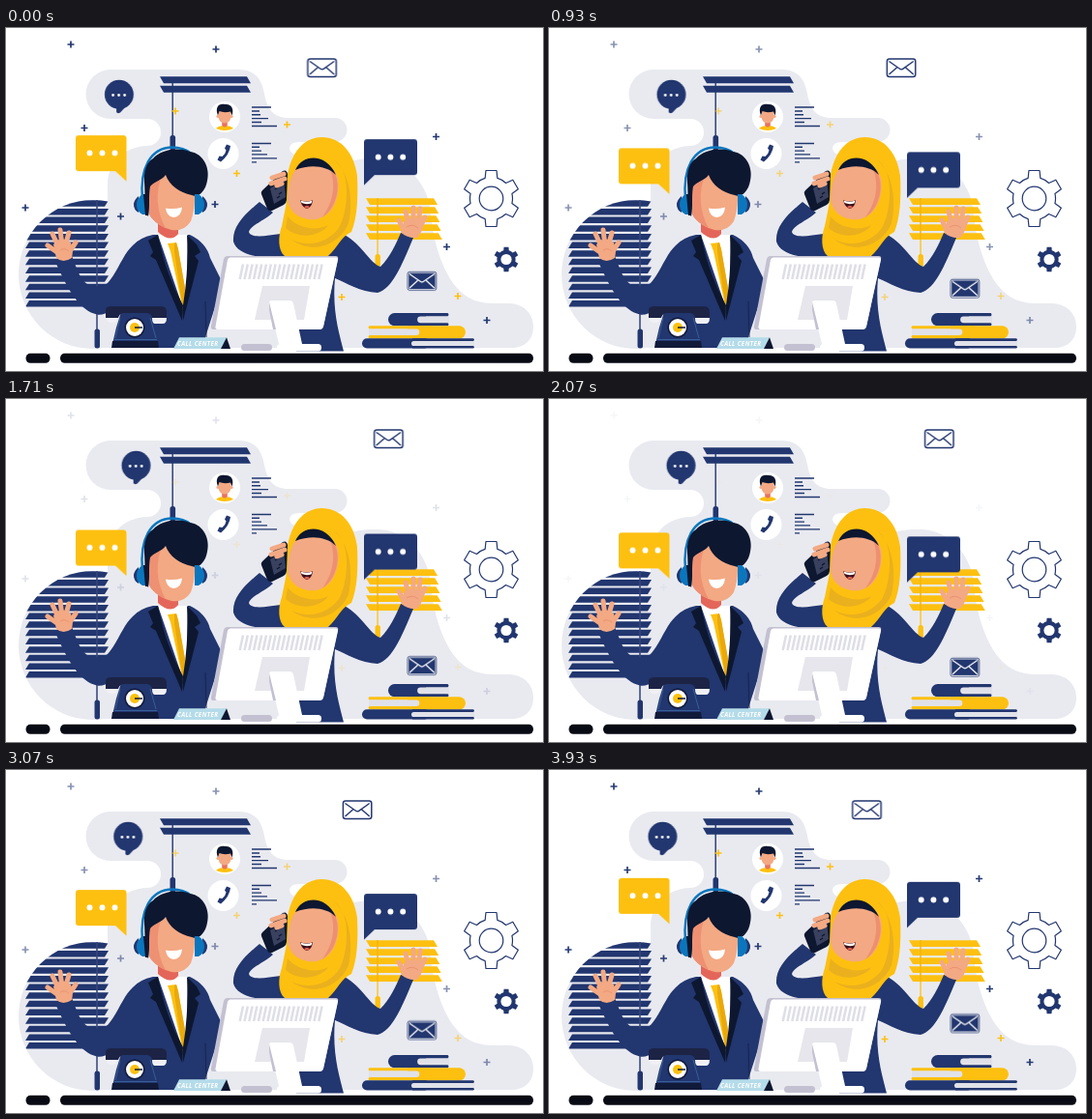
These frames come from a looping animation (555x355 px, 4000 ms). An HTML page:

```html
<!DOCTYPE html>
<html lang="en">
<head>
<meta charset="utf-8">
<title>Call center</title>
<style>
  html, body { margin: 0; width: 100%; height: 100%; overflow: hidden; background: #fff; }
  svg { display: block; width: 555px; height: 355px; }
  .move { animation: move 2s linear -10ms infinite alternate; }
  .fade { animation: fade 2s linear -10ms infinite alternate; }
  @keyframes move { to { transform: translate(var(--x, 0), var(--y, 0)); } }
  @keyframes fade { to { opacity: 0; } }
  .navy { fill: #22366f; }
  .dark { fill: #0d1730; }
  .gold { fill: #fdc010; }
  .skin { fill: #f3a983; }
  .pale { fill: #e9eaf0; }
  .white { fill: #fff; }
  .line { fill: none; stroke: #22366f; stroke-width: 1.4; }
  .hand { fill: none; stroke: #f3a983; stroke-width: 5; stroke-linecap: round; stroke-linejoin: round; }
</style>
</head>
<body>
<svg viewBox="0 0 555 355">
  <defs>
    <clipPath id="disc"><circle cx="90" cy="255" r="77"/></clipPath>
  </defs>

  <!-- backdrop -->
  <circle class="pale" cx="90" cy="255" r="77"/>
  <path class="pale" d="M108 43H240C258 43 264 53 267 68C270 84 276 93 292 93H340A12.500 12.500 0 0 1 340 118H303Q293 118 293 125Q294 131 305 133L352 140C362 135 374 135 386 135C405 136 419 147 428 160C436 172 438 182 439 192C441 217 449 246 462 264C474 280 487 285 505 285H520C537 286 545 297 545 309C545 323 536 331 522 331H90L105 240V162C105 140 121 123 146 122A14 14 0 0 0 146 94H108A25.500 25.500 0 0 1 108 43Z"/>

  <!-- window blinds -->
  <g class="navy">
    <path d="M159 50.300H249L253 57.300H163ZM159 59.800H249L253 66.800H163Z"/>
    <rect x="171.500" y="57" width="1.400" height="55"/>
    <rect x="93.300" y="178" width="1.400" height="136"/>
    <rect x="169.500" y="111" width="5.600" height="16" rx="2.500"/>
    <rect x="91.500" y="311.500" width="5.500" height="20" rx="2.500"/>
    <g id="leftBlind" clip-path="url(#disc)"></g>
  </g>
  <path d="M94 178V289" stroke="#59668f" stroke-width=".6"/>
  <g class="gold">
    <g id="rightBlind"></g>
    <rect x="383.400" y="176" width="1.300" height="60"/>
    <rect x="381.500" y="234" width="5.400" height="13.500" rx="2.500"/>
  </g>
  <path d="M384 176V219" stroke="#eaa90f" stroke-width=".7"/>

  <!-- contact list -->
  <circle class="white" cx="226" cy="92" r="16"/>
  <path class="gold" d="M217 104Q219.500 101 226 101Q232.500 101 235 104Q231 106 226 106Q221 106 217 104Z"/>
  <path d="M223.200 95h5.600v6q-2.800 3-5.600 0Z" fill="#e8735f"/>
  <path class="skin" d="M219.500 85h13v7q-1 6.500-6.500 6.500t-6.500-6.500Z"/>
  <circle class="skin" cx="219" cy="91.500" r="1.600"/><circle class="skin" cx="233" cy="91.500" r="1.600"/>
  <path class="dark" d="M219 90.500C216 83 219 78 226 79C233 78 236 84 233.500 90.500L232 86.500Q225 88 220.500 86Z"/>
  <circle class="white" cx="224.500" cy="130" r="16"/>
  <path class="navy" d="M228 120.500L232 122Q231 131 222 138.500L218.500 136.500L220.500 132.500L223.500 133Q227 130 227.500 126.500L226 124.500Z"/>
  <path class="line" d="M254 82h20m-20 4h8m-8 3.800h9m-9 3.800h17m-17 3.900h10m-10 4h26M254 119.500h20m-20 3.800h8m-8 3.800h10m-10 3.800h16m-16 4h26m-26 4h5"/>

  <!-- man -->
  <g>
    <path class="navy" d="M51 242L68 236C73 248 76 260 84 265C92 268 99 269 105 264C115 253 121 234 131 225Q138 217 152 214H190Q207 222 211 238L224 264L206 320V331H122V289C112 290 103 298 94 296.500C74 292 62 266 51 242Z"/>
    <path class="white" d="M157 214H188L187 266L183 290Z"/>
    <path d="M157 202H178V213Q170 223 157 211Z" fill="#e4665a"/>
    <path class="gold" d="M167 223L176 222L178 229L186 275L183 292L170 231Z"/>
    <path d="M174 223L176 222L178 229L186 275L183 292L174 232Z" fill="#e9a90d"/>
    <path class="dark" d="M157 214L147 220L152 232L149 236L155 240L182 303L183 287Q165 255 157 214ZM187 214L197 224L201 232L195 236L199 241L183 303L183 287Q189 250 187 214Z"/>
    <path d="M206 283L207 320" stroke="#16244f" stroke-width="1"/>
    <path class="skin" d="M147 150H194C196 168 196 187 191 200Q184 211 171 209Q158 206 149 195Z"/>
    <path d="M147 160L162 151C154 168 155 190 165 207Q153 202 148 193Z" fill="#ee9072"/>
    <path d="M141 177C138 146 149 123.500 172 123.500C188 123.500 198 133 202 146" fill="none" stroke="#0b76bd" stroke-width="2.400"/>
    <path class="dark" d="M147 195C143 191 144 175 143 160C142 149 145 139 152 135C160 126 177 123 190 128C205 130 211 146 208 158C206 170 198 176 192 173C179 170 169 163 165 152C161 158 154 158 149 164C147 174 149 185 147 195Z"/>
    <path class="white" d="M165 186.500Q174 188 182 185.500Q181 196 173 196Q166 195 165 186.500Z"/>
    <path class="navy" d="M137 174Q132 178 132 183T137 191ZM203 174Q208 178 208 183T203 191Z"/>
    <path d="M146 172h-5q-6 4-6 11t6 10h5ZM195 172h4q6 4 6 11t-6 10h-4Z" fill="#0b76bd"/>
    <path class="dark" d="M142 172h5v22h-3Z"/>
    <path class="skin" d="M49 224Q58 214 67 222Q70 231 68 238Q59 244 52 238Z"/>
    <path class="hand" d="M54 233L43 225M55 228L48 213M58 225L56 209M61 226L65 212M64 234L72 222"/>
    <path d="M56 230Q60 227 65 231" fill="none" stroke="#e88d70" stroke-width=".8"/>
  </g>

  <!-- woman -->
  <g>
    <path class="navy" d="M262 180C245 194 234 206 235 221C239 235 262 238 285 239L300 334.500H349C344 315 337 292 340 259C352 264 366 273 384 274C399 270 409 246 421 217L408 212C403 224 396 238 387 247C376 244 366 220 346 212.500Q340 210 332 214L284 213C269 215 253 218 251 211C253 204 266 200 276 191Z"/>
    <path d="M340 258Q333 250 331 239" fill="none" stroke="#16244f" stroke-width="1"/>
    <path class="gold" d="M326 113C347 113 360 130 363 153C364 177 363 196 357 211C346 216 343 227 333 236H288C281 230 281 216 285 205L290 180C287 151 296 114 326 113Z"/>
    <path d="M337 135C358 145 354 190 344 207C334 221 314 228 295 219C318 236 346 223 354 202C360 177 354 146 337 135ZM291 195C300 207 321 211 333 204C325 216 302 219 289 207Z" fill="#eab01d"/>
    <path class="skin" d="M299 147C306 132 334 132 343 155C346 173 339 194 321 198C304 200 291 190 291 175C292 163 294 153 299 147Z"/>
    <path d="M334 143C348 154 345 184 327 196C341 176 340 158 334 143Z" fill="#ee8f72"/>
    <path class="dark" d="M299 147C306 130 331 129 341 152C331 142 314 141 299 147Z"/>
    <path d="M304 178Q311 181 317 178Q316 186 311 187Q306 186 304 178Z" fill="#3b0d19"/>
    <path class="white" d="M304.500 178.500Q311 181 316.500 178.500L315.500 181.500Q310 183 305.500 181Z"/>
    <path d="M308 185q3-2 6 0q-3 3-6 0Z" fill="#e4665a"/>
    <path class="dark" d="M265 168L286 148Q290 146 291 151L290 178Q290 181 287 183L275 189Q272 190 270 187L264 172Q263 170 265 168Z"/>
    <path d="M273 166L287 157L289 175L277 182Z" fill="#39415f"/>
    <path d="M278 167l3-2m1 7l3-2m-5 6l3-2" stroke="#0d1730" stroke-width="1.500"/>
    <path class="hand" d="M287 151L275 155M288 156L274 161M285 161L280 163"/>
    <path class="skin" d="M411 200Q418 194 431 200Q433 208 425 217Q414 218 408 211Z"/>
    <path class="hand" d="M411 209L406 199M416 203L413 190M421 202L421 186M426 203L428 187M428 206L433 196"/>
    <path d="M414 206Q420 202 426 207" fill="none" stroke="#e88d70" stroke-width=".8"/>
  </g>

  <!-- computer -->
  <rect x="243" y="327" width="32" height="7" rx="3.500" fill="#c3c1d1"/>
  <path d="M229 236H341Q344 236 343 239L328 309Q327 312 324 312H215Q211 312 212 308L225 239Q226 236 229 236Z" fill="#c3c1d1"/>
  <path d="M232 237.500H341Q343.500 237.500 343 240L328 309Q327 312 324 312H219Q216 312 216.500 309L229 240Q229.500 237.500 232 237.500Z" fill="#fff"/>
  <path id="vents" fill="none" stroke="#dedee6" stroke-width="2.500"/>
  <path d="M265 267H314L308 302H257Z" fill="#e6e6ec"/>
  <path d="M272 284Q272 282 275 282H293Q296 282 297 285L306 327H282Z" fill="#fff"/>
  <path d="M272 284L279 312H276L272 292Z" fill="#c3c1d1"/>
  <rect class="white" x="280" y="327" width="46" height="7.500" rx="3.500"/>

  <!-- telephone -->
  <path class="navy" d="M119 294H149L155 312L158 327H110L114 310Z"/>
  <path d="M110 324H157L158 331H109Z" fill="#111a39"/>
  <path d="M112 322.500H156M118 300L113 321M149 300L155 321" stroke="#3d6aa3" stroke-width=".8"/>
  <path d="M103 291Q104 288 109 288H160Q166 288 166 294V300H151Q151 296 146 295H121Q117 296 116 300H103Z" fill="#1c2345"/>
  <path d="M151 300H166Q166 306 162 306H154Q151 306 151 300ZM103 300H116Q115 305 110 305Q104 305 103 300Z" fill="#f1f1f5"/>
  <circle cx="133" cy="310" r="10.500" fill="#111a39"/>
  <circle class="white" cx="133" cy="310" r="9"/>
  <circle class="gold" cx="133" cy="310" r="5"/>
  <path d="M133 310h8" stroke="#111a39" stroke-width="1.500"/>

  <!-- name plate -->
  <path d="M179 320.300H228L222 332H173Z" fill="#b4dbe9"/>
  <path class="dark" d="M228 320.300L232 332H222Z"/>
  <text x="177" y="328.600" fill="#fff" font-family="'Open Sans', sans-serif" font-size="6.200" font-weight="700" font-style="italic" letter-spacing=".4">CALL CENTER</text>

  <!-- books -->
  <rect class="navy" x="395" y="295" width="40" height="13.300" rx="6.600"/>
  <path class="navy" d="M415 295H456.500q2 1.700 0 3.400H415ZM415 305H456.500q2 1.700 0 3.300H415Z"/>
  <path d="M458 298.400V305.200H428.500a3.400 3.400 0 0 1 0-6.800Z" fill="#e0e1e9"/>
  <rect class="gold" x="414" y="308.300" width="61" height="13" rx="6.500"/>
  <path class="gold" d="M440 308.300H375.500q-2 1.600 0 3.200H440ZM440 318H375.500q-2 1.600 0 3.300H440Z"/>
  <path d="M375 311.500V318H424a3.200 3.200 0 0 0 0-6.500Z" fill="#e0e1e9"/>
  <rect class="navy" x="368" y="321.300" width="70" height="10.200" rx="5.100"/>
  <path class="navy" d="M420 321.300H483q2 1.300 0 2.600H420ZM420 329H483q2 1.300 0 2.500H420Z"/>
  <path d="M484 323.900V329H421.500a2.500 2.500 0 0 1 0-5.100Z" fill="#e0e1e9"/>

  <!-- desk -->
  <g fill="#080a14">
    <rect x="20.500" y="336.800" width="25" height="10" rx="4.700"/>
    <rect x="56" y="336.800" width="489" height="10" rx="4.700"/>
  </g>

  <!-- gears -->
  <path id="bigGear" class="line" style="fill:#fff;stroke-width:1.200" stroke-linejoin="round"/>
  <circle class="line" cx="501.500" cy="176.500" r="12.300" style="stroke-width:1.200"/>
  <path id="smallGear" class="navy"/>
  <circle class="white" cx="517" cy="239.500" r="5.600"/>

  <g id="stars" class="fade" stroke-width="1.700"></g>

  <!-- messages -->
  <g class="move" style="--x:80.500px">
    <rect class="line" x="311.400" y="32" width="29.400" height="18.400" rx="2.500" style="fill:#fff;stroke-width:1.500"/>
    <path class="line" d="M313.500 34.500L324.500 42.300Q326.100 43.400 327.700 42.300L338.700 34.500M313.500 48L321.500 41M338.700 48L330.700 41"/>
  </g>
  <g class="move" style="--y:16.500px">
    <rect class="line" x="415" y="252.300" width="29.800" height="19" rx="2" style="fill:#fff;stroke-width:.8"/>
    <rect class="navy" x="416.200" y="253.500" width="27.400" height="16.600" rx="1"/>
    <path d="M417 254.500L428.300 262.300Q429.900 263.400 431.500 262.300L442.800 254.500M417 269L425.500 261.300M442.800 269L434.300 261.300" fill="none" stroke="#fff" stroke-width="1.200"/>
  </g>
  <g class="move" style="--x:20.500px">
    <path class="navy" d="M114 80V87Q115 89 118 87.500L124 81Z"/>
    <circle class="navy" cx="116.800" cy="68.800" r="15"/>
    <path d="M110.500 69.500h0m6 0h0m6 0h0" stroke="#fff" stroke-width="2.800" stroke-linecap="round"/>
  </g>
  <g class="move" style="--y:28.500px">
    <path class="gold" d="M75 111H121.500Q124.500 111 124.500 114V158.500L113 148H75Q72 148 72 145V114Q72 111 75 111Z"/>
    <path d="M86.500 129.300h0m13 0h0m13 0h0" stroke="#fff" stroke-width="6" stroke-linecap="round"/>
  </g>
  <g class="move" style="--y:28.500px">
    <path class="navy" d="M373 115H422Q425 115 425 118V149Q425 152 422 152H381L370 162.500V118Q370 115 373 115Z"/>
    <path d="M384.700 133.600h0m12.700 0h0m12.800 0h0" stroke="#fff" stroke-width="6" stroke-linecap="round"/>
  </g>
</svg>
<script>
  const $ = id => document.getElementById(id);
  const repeat = (n, f) => Array.from({ length: n }, (_, i) => f(i)).join('');

  const slat = (x, y, w, h, skew) => `<path d="M${x} ${y}h${w}l${skew} ${h}h${-w}Z"/>`;
  $('leftBlind').innerHTML = repeat(13, i => slat(24, 178.3 + i * 8.65, 82, 6.5, -4));
  $('rightBlind').innerHTML = repeat(5, i => slat(372, 176.3 + i * 9, 70 + i * 1.2, 6.8, 4));
  $('vents').setAttribute('d', repeat(18, i => `M${245 + i * 4.8} 244.500l-3.300 15.500`));

  // Teeth are trapezoids; foot and tip are half-widths as fractions of the pitch.
  function gear(id, cx, cy, teeth, inner, outer, foot, tip) {
    const point = (r, a) => {
      const angle = a * 2 * Math.PI / teeth - Math.PI / 2;
      return `${(cx + r * Math.cos(angle)).toFixed(2)} ${(cy + r * Math.sin(angle)).toFixed(2)}`;
    };
    const d = repeat(teeth, i =>
      `${i ? `A${inner} ${inner} 0 0 1 ` : 'M'}${point(inner, i - foot)}L${point(outer, i - tip)}` +
      `L${point(outer, i + tip)}L${point(inner, i + foot)}`);
    $(id).setAttribute('d', `${d}A${inner} ${inner} 0 0 1 ${point(inner, -foot)}Z`);
  }
  gear('bigGear', 501.5, 176.5, 6, 22, 29.5, .28, .18);
  gear('smallGear', 517, 239.5, 6, 9.6, 13, .28, .18);

  const stars = (color, spots) => spots.map(([x, y]) =>
    `<path stroke="${color}" d="M${x - 3.5} ${y}h7m-3.500-3.500v7"/>`).join('');
  $('stars').innerHTML =
    stars('#22366f', [[67, 17], [217, 22], [81, 103.5], [20, 186], [118.5, 195], [216, 182.5],
      [444.5, 112.5], [455.5, 226.5], [497, 302.5]]) +
    stars('#fdc010', [[175, 86], [290.5, 100], [238.5, 150.5], [347, 278.5], [467, 277.5]]);
</script>
</body>
</html>
```
